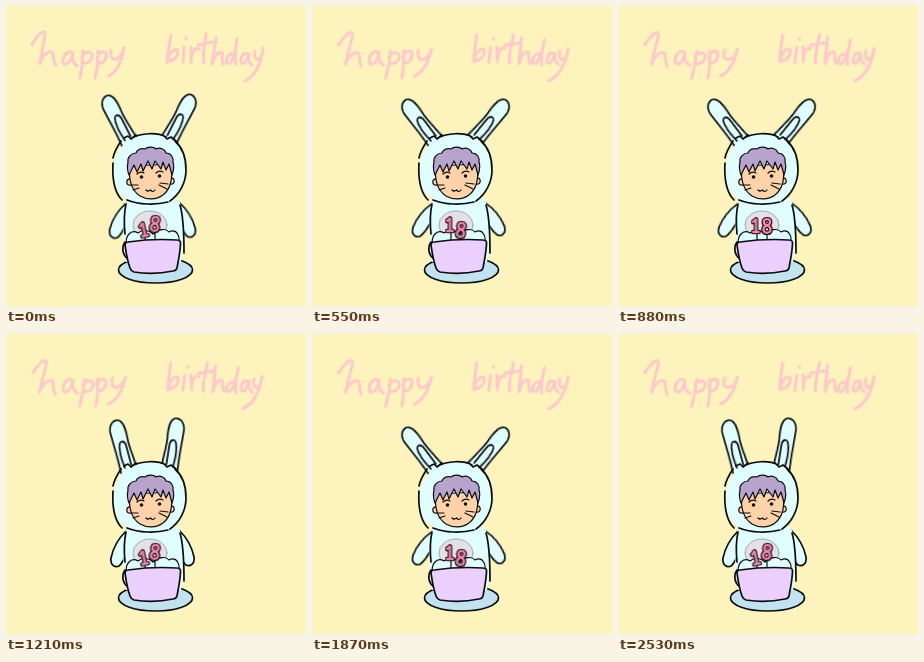
An HTML page that plays this animation: 300 by 300 pixels, repeating every 2.64 s.

```html
<!DOCTYPE html>
<html lang="en">
<head>
<meta charset="utf-8">
<title>Happy birthday</title>
<style>
html, body { margin: 0; width: 100%; height: 100%; overflow: hidden; background: #fcf3bd; }
svg { display: block; width: 100vw; height: 100vh; }
path, ellipse, circle { stroke-linecap: round; stroke-linejoin: round; }

.text path {
  fill: none; stroke: #ffc8cb; stroke-width: 3;
  transform-box: fill-box; transform-origin: center;
  animation: boil .33s step-end infinite;
}
.text path:nth-child(odd) { --x: .6px; --y: .5px; --r: 4deg; }
.text path:nth-child(even) { --x: .2px; --y: -.5px; --r: -3deg; }
.text path:last-child { --x: -1.5px; --y: 0px; --r: 2deg; }
@keyframes boil {
  33.3% { transform: translate(calc(var(--x) * .5), calc(var(--y) * -.5)) rotate(calc(var(--r) * -.4)); }
  66.6% { transform: translate(var(--x), var(--y)) rotate(var(--r)); }
}

.ink, .suit, .skin, .hair { fill: none; stroke: #0b0d0e; stroke-width: 1.7; }
.suit, .fill { fill: #e0feff; }
.fine { stroke-width: 1.2; }
.skin { fill: #fed3a9; }
.hair { fill: #b8a3cd; }

/* poses for ears and arms, each held for three drawings */
.swing { animation: swing 1.32s step-end infinite; }
.left.ear { --up: -17deg; --mid: -27deg; --out: -39deg; --b: 2deg; }
.right.ear { --up: 11deg; --mid: 27deg; --out: 41deg; --b: -2deg; }
.left.arm { --up: 0deg; --mid: 3deg; --out: 10deg; }
.right.arm { --up: 0deg; --mid: -3deg; --out: -11deg; }
@keyframes swing {
  0% { transform: rotate(var(--mid)); }
  24.99% { transform: rotate(var(--out)); }
  74.99% { transform: rotate(var(--up)); }
}
.ear g { animation: sway .33s step-end infinite; }
@keyframes sway {
  33.3% { transform: rotate(calc(var(--b) * .5)); }
  66.6% { transform: rotate(var(--b)); }
}

.digit { animation: bob 1.32s step-end infinite; }
.one { --ay: 4px; --ar: -12deg; --by: -1px; --br: 0deg; }
.eight { --ay: -2px; --ar: 8deg; --by: 4px; --br: 8deg; }
@keyframes bob {
  0%, 83.3% { transform: translateY(var(--ay)) rotate(var(--ar)); }
  8.3%, 58.3% { transform: none; }
  33.3% { transform: translateY(var(--by)) rotate(var(--br)); }
}
.digit { fill: none; }
.digit use { stroke: #1c0f16; stroke-width: 4.6; }
.digit use + use { stroke: #f285ab; stroke-width: 2.3; }
</style>
</head>
<body>
<svg viewBox="0 0 300 300" role="img" aria-label="happy birthday, 18">
  <defs>
    <g id="ear">
      <path class="suit" d="M-8 3C-7-12-8-27-8-39C-7-47-2-50 2-49C8-47 8-37 7-26C7-16 8-8 9 3"/>
      <path class="ink" stroke-width="1.3" d="M-3-1C-4-10-4-20-2-25C0-29 4-27 4-22C4-15 4-8 4-2"/>
    </g>
    <path id="arm" class="suit" d="M1-3C-6 4-12 14-14 24C-15 31-10 34-6 32C-2 29 0 23 2 18"/>
    <path id="n1" d="M-2.5-4L.5-6.5V6M-2.5 6H3.2"/>
    <path id="n8" d="M0-.5C-4.5-2-4-6.8 0-6.8S4.3-2 0-.5C-5 1.2-4.4 6.8 0 6.8S5 1.2 0-.5Z"/>
  </defs>

  <g class="text">
    <path d="M26 39C29 33 35 25 38 26C41 27 36 40 34 58C36 49 43 44 46 46C48 49 47 55 50 59"/>
    <path d="M67 47C62 43 56 50 57 57C60 61 66 55 67 47C66 54 67 58 71 60"/>
    <path d="M77 45C77 53 76 63 74 72M76 51C80 44 87 45 86 51C85 56 80 58 76 57"/>
    <path d="M92 45C92 54 91 64 89 72M91 51C95 43 102 45 100 51C99 56 95 58 91 57"/>
    <path d="M105 44C104 51 106 54 110 53C114 51 117 47 118 42C116 54 112 65 103 70"/>
    <path d="M165 29C164 38 161 47 161 56C163 45 171 41 172 45C172 51 167 56 161 55"/>
    <path d="M178 41L177 56M180 32L180 32.5"/>
    <path d="M185 41L185 56C185 48 188 41 193 43"/>
    <path d="M200 28C199 37 196 49 198 57M192 39L206 36"/>
    <path d="M210 32C209 41 207 50 206 58C208 50 213 45 216 47C217 50 215 54 217 58"/>
    <path d="M228 48C223 46 219 53 221 57C225 59 229 52 231 33C230 42 228 52 230 58"/>
    <path d="M242 48C238 45 234 51 235 57C238 59 241 54 243 48C242 54 243 57 246 59"/>
    <path d="M249 45C248 52 250 55 253 53C255 51 257 46 257 42C255 58 249 70 239 75"/>
  </g>

  <g transform="translate(122 134)"><g class="swing left ear"><g><use href="#ear"/></g></g></g>
  <g transform="translate(164 133)"><g class="swing right ear"><g><use href="#ear" transform="scale(-1 1)"/></g></g></g>
  <g transform="translate(119 200)"><g class="swing left arm"><use href="#arm"/></g></g>
  <g transform="translate(174 199)"><g class="swing right arm"><use href="#arm" transform="scale(-1 1)"/></g></g>

  <ellipse class="ink" cx="149.5" cy="264" rx="37" ry="13" style="fill:#c3e2f0"/>
  <path class="fill" d="M120 193C117 212 116 238 120 256H175C179 232 178 209 173 193Z"/>
  <path class="ink" d="M120 198C118 207 118 218 119 228M119 236C115 242 117 249 121 252M174 199C177 209 178 226 178 247"/>
  <path class="fill" d="M144 128C123 128 108 143 107 165C107 188 122 199 146 198C167 198 180 186 180 164C180 143 168 128 144 128Z"/>
  <path class="ink" d="M126 132C135 127 151 126 160 131M169 135C177 142 180 153 180 164C180 176 174 188 164 195M115 135C111 141 108 147 107 152M107 157C106 174 109 187 116 194M121 194C133 199 150 199 162 196M118 132L122 130L125 133L130 129M157 129L161 133L165 131L170 135"/>

  <g>
    <circle class="skin fine" cx="124" cy="176" r="3.2"/>
    <circle class="skin fine" cx="165" cy="175" r="3.2"/>
    <path class="skin fine" d="M124 160C122 174 126 185 134 190C141 194 150 194 157 189C165 183 167 172 165 158Z"/>
    <path class="hair fine" d="M123 169C121 164 121 160 122 156C121 151 126 147 130 147C131 143 136 142 139 143C142 140 148 141 150 143C154 141 159 143 160 147C165 147 168 152 167 156C169 161 167 166 166 169L163 158L160 164L157 156L155 163L149 155L146 163L142 155L137 165L135 158L131 166L128 159Z"/>
    <path class="ink fine" d="M131 168Q134 165 138 167M150 167Q153 164 157 166M140 184Q142 186 144.500 184Q147 187 149 184M153 179L161 183M154 177L162 178M126 179L132 179M127 184L133 182"/>
    <circle cx="135.500" cy="171" r="1.8" fill="#111"/>
    <circle cx="153.500" cy="170" r="1.8" fill="#111"/>
  </g>

  <ellipse cx="144" cy="219" rx="17" ry="14" fill="#e5dfe6" stroke="#9eacad" stroke-width="1"/>
  <path class="suit fine" d="M121 240C118 230 125 223 132 227C137 223 143 224 147 228C152 223 160 222 163 226C171 222 175 231 172 239Z"/>
  <path class="ink fine" d="M139 226V236M149 226V236"/>
  <g transform="translate(137.500 220)"><g class="digit one"><use href="#n1"/><use href="#n1"/></g></g>
  <g transform="translate(149 220)"><g class="digit eight"><use href="#n8"/><use href="#n8"/></g></g>
  <path class="ink" style="fill:#ebcffd" d="M122 236C136 234 156 233 171 234Q175 234 174.500 238C174 248 172 256 171 262Q170 265 167 265C153 268 140 268 128 266Q125 265 124 262C121 254 120 246 119 239Q119 236 122 236Z"/>
</svg>
</body>
</html>
```
